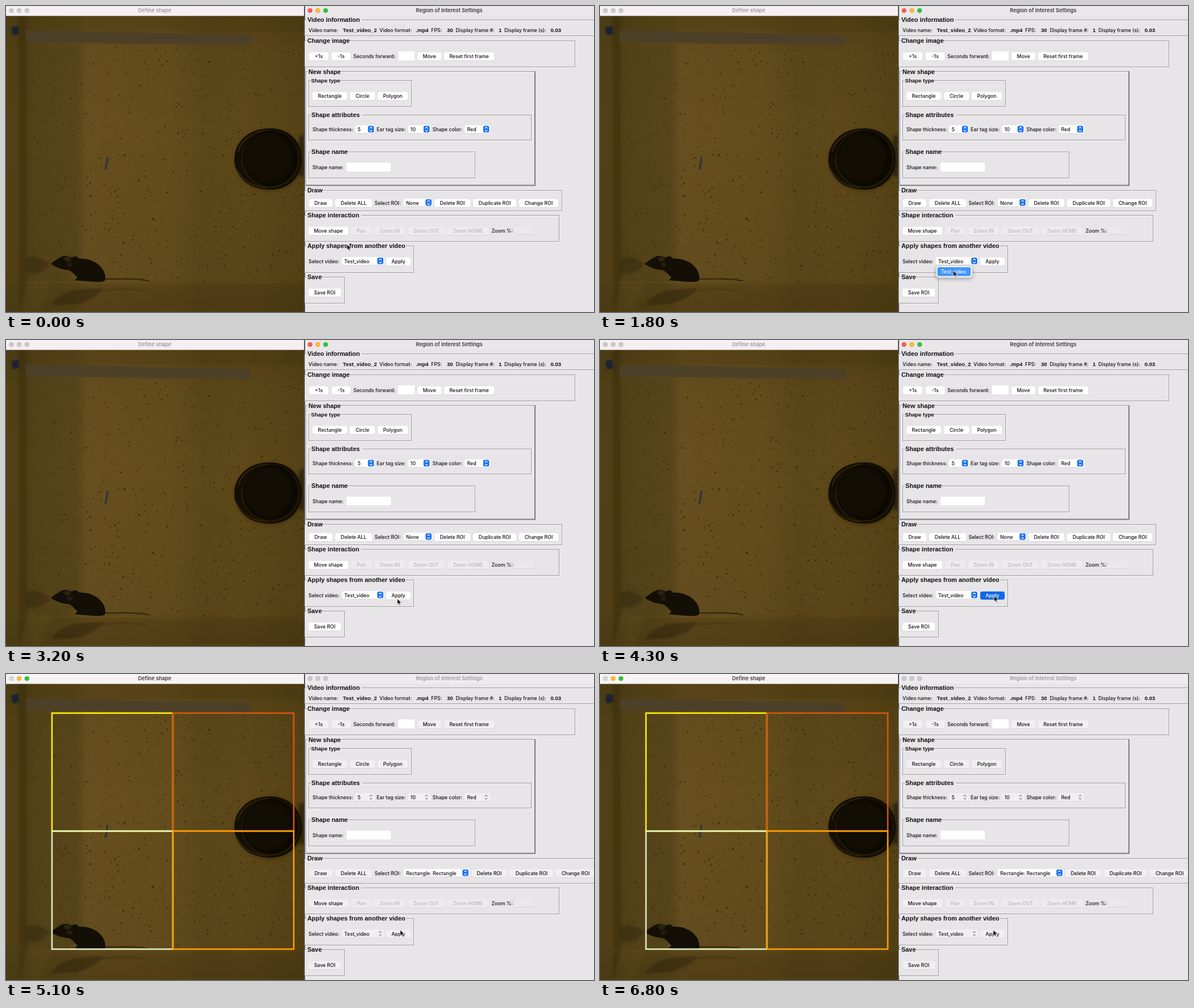
Animation, 1036 px wide and 540 px high, one loop 6900 ms. Source, as an HTML page with a canvas:

```html
<!DOCTYPE html>
<html lang="en">
<head>
<meta charset="utf-8">
<title>Region of Interest Settings</title>
<style>
html, body { margin: 0; width: 1036px; height: 540px; overflow: hidden; background: #e7e5e7; }
canvas, svg { position: absolute; left: 0; top: 0; display: block; }
text { font: 500 8.75px Inter, sans-serif; fill: #111; white-space: pre; }
.head { font: bold 10.9px "Liberation Sans", sans-serif; }
.sub { font: bold 9.6px "Liberation Sans", sans-serif; }
.title { font-size: 9.2px; font-weight: 600; fill: #3a383a; }
.mid { text-anchor: middle; }
.off, .dim { fill: #b7b5b7; }
.title.off { fill: #9d999c; }
.lit { fill: #fff; }
.line { fill: none; stroke: #9a989a; }
.pop { filter: drop-shadow(0 2px 3px rgba(0, 0, 0, .3)); }
#before, #after, #menu, #press { animation: 6900ms step-end infinite; }
#before { animation-name: before; }
#after { animation-name: after; }
#menu { animation-name: menu; }
#press { animation-name: press; }
#cursor { animation: move 6900ms infinite; }
@keyframes before { 0% { visibility: visible } 63.76%, 100% { visibility: hidden } }
@keyframes after { 0% { visibility: hidden } 63.76%, 100% { visibility: visible } }
@keyframes menu { 0% { visibility: hidden } 18.83% { visibility: visible } 33.32%, 100% { visibility: hidden } }
@keyframes press { 0% { visibility: hidden } 60.86% { visibility: visible } 63.76%, 100% { visibility: hidden } }
@keyframes move {
  0% { transform: translate(601px, 420.5px); animation-timing-function: steps(9) }
  13.04%, 20.28% { transform: translate(624px, 447px); animation-timing-function: steps(4) }
  26.08%, 33.33% { transform: translate(622.5px, 467px); animation-timing-function: steps(7) }
  43.47%, 55.06% { transform: translate(689.5px, 456.5px); animation-timing-function: steps(4) }
  60.86%, 86.95% { transform: translate(694.5px, 451.5px); animation-timing-function: steps(2) }
  89.85%, 100% { transform: translate(692.8px, 451.5px) }
}
</style>
</head>
<body>
<canvas id="video" width="526" height="540"></canvas>
<svg id="ui" width="1036" height="540" viewBox="0 0 1036 540"></svg>
<script>
const text = (x, cy, s, cls = "") => `<text x="${x}" y="${cy + 3.2}" class="${cls}">${s}</text>`;
const box = (x, y, w, h, fill, r = 0, extra = "") =>
  `<rect x="${x}" y="${y}" width="${w}" height="${h}" rx="${r}" fill="${fill}" ${extra}/>`;

function lights(x, active) {
  const colors = active || ["#cbc7ca", "#cbc7ca", "#cbc7ca"];
  return colors.map((c, i) =>
    `<circle cx="${x + i * 13.7}" cy="8" r="4.1" fill="${c}" stroke="#000" stroke-opacity=".12" stroke-width=".6"/>`).join("");
}

function button(x1, x2, cy, s, { fill = "#fff", cls = "" } = {}) {
  const w = x2 - x1;
  return box(x1, cy - 6.6, w, 14.2, "#000", 3.6, 'opacity=".13"') +
    box(x1, cy - 7.2, w, 14.2, fill, 3.6) + text((x1 + x2) / 2, cy, s, "mid " + cls);
}

function select(x1, x2, cy, s, fill, blue) {
  const cx = x2 - 7, top = cy - 6.4;
  return box(x1, cy - 6.8, x2 - x1, 13.6, "#000", 3.6, 'opacity=".11"') +
    box(x1, cy - 7.4, x2 - x1, 13.6, fill, 3.6) + text(x1 + 4.5, cy, s) +
    (blue ? box(cx - 5.3, top, 10.6, 11.4, "#1670ee", 2.8) : "") +
    `<path d="M${cx - 2.3} ${top + 4.4}l2.3-2.3 2.3 2.3m-4.6 2.8l2.3 2.3 2.3-2.3" fill="none" stroke="${blue ? "#fff" : "#8b898b"}" stroke-width="1.2"/>`;
}

function group(x1, y1, x2, y2, s, labelX, cls = "head") {
  const w = x2 - x1, h = y2 - y1, size = cls === "head" ? 5.6 : 5;
  return `<rect x="${x1 + 1.5}" y="${y1 + 1.5}" width="${w}" height="${h}" fill="none" stroke="#f8f7f8"/>` +
    `<rect x="${x1 + .5}" y="${y1 + .5}" width="${w}" height="${h}" class="line"/>` +
    box(labelX - 1, y1 - 4, s.length * size + 1, 9, "#e7e5e7") + text(labelX, y1 + .7, s, cls);
}

function panel(active) {
  const fill = active ? "#fff" : "#f1eff1";
  const extra = active ? 0 : 65, row = active ? 348 : 352, d = active ? 0 : 8;
  const dim = { fill: "#edebed", cls: "dim" };
  const btn = (x1, x2, y, s) => button(x1, x2, y, s, { fill });
  const sel = (x1, x2, y, s) => select(x1, x2, y, s, fill, active);
  const winColors = ["#fc5b54", "#f9bb2d", "#2fc440"];
  return box(0, 0, 526, 17.5, active ? "#f5eff1" : "#f7f3f4") +
    lights(9.5, active ? null : ["#d5d2d4", "#f9bb2d", "#2fc440"]) +
    text(262, 7.8, "Define shape", "mid title" + (active ? " off" : "")) +
    box(525, 0, 2, 540, "#54504c") + box(527, 0, 509, 540, "#e7e5e7") +
    box(527, 0, 509, 17, active ? "#eae7ea" : "#edebed") +
    lights(535.7, active ? winColors : null) +
    text(781, 7.8, "Region of Interest Settings", "mid title" + (active ? "" : " off")) +

    group(526, 24, 1040, 52, "Video information", 531) +
    text(533, 43, "Video name:") + text(593.5, 43, "Test_video_2", "sub") +
    text(658, 43, "Video format:") + text(722, 43, ".mp4", "sub") +
    text(749, 43, "FPS:") + text(777, 43, "30", "sub") +
    text(792.5, 43, "Display frame #:") + text(868, 43, "1", "sub") +
    text(878, 43, "Display frame (s):") + text(959.5, 43, "0.03", "sub") +

    group(526, 61, 1002, 107, "Change image", 531) +
    btn(534, 568, 89, "+1s") + btn(574, 607, 89, "-1s") +
    text(612, 89, "Seconds forward:") + box(691, 80, 29, 16, "#fff") +
    btn(725, 767, 89, "Move") + btn(772, 860, 89, "Reset first frame") +

    `<path d="M528.5 317V115.5H932" class="line"/><path d="M530 315V117H930" fill="none" stroke="#f8f7f8"/>` +
    `<path d="M528 316.5H932V115" fill="none" stroke="#7c7a7c" stroke-width="2"/>` +
    box(532, 111, 58, 9, "#e7e5e7") + text(533, 116.4, "New shape", "head") +
    group(533, 131, 714, 177, "Shape type", 537.5, "sub") +
    btn(540, 601, 159, "Rectangle") + btn(606, 650, 159, "Circle") + btn(655, 708, 159, "Polygon") +
    group(533, 192, 925, 236, "Shape attributes", 538) +
    text(540, 218, "Shape thickness:") + sel(615, 650, 218, "5") +
    text(653, 218, "Ear tag size:") + sel(708, 748, 218, "10") +
    text(751.5, 218, "Shape color:") + sel(808, 853, 218, "Red") +
    group(533, 257, 826, 303, "Shape name", 538) +
    text(540, 285, "Shape name:") + box(600, 276.5, 78, 15.5, "#fff") +

    group(526, 325, active ? 979 : 1044, active ? 361 : 369, "Draw", 531) +
    btn(534, 575, row, "Draw") + btn(580, 645, row, "Delete ALL") + text(649.5, row, "Select ROI:") +
    select(700.5, 751.5 + extra, row - .6, active ? "None" : "Rectangle: Rectangle", "#fff", true) +
    btn(755 + extra, 818 + extra, row, "Delete ROI") +
    btn(823 + extra, 899 + extra, row, "Duplicate ROI") +
    btn(904 + extra, 973 + extra, row, "Change ROI") +

    `<g transform="translate(0 ${d})">` +
    group(526, 369, 974, 415, "Shape interaction", 531) +
    btn(533, 603, 397, "Move shape") + button(608, 644, 397, "Pan", dim) +
    button(649, 703, 397, "Zoom IN", dim) + button(708, 773, 397, "Zoom OUT", dim) +
    button(778, 850, 397, "Zoom HOME", dim) + text(855.5, 397, "Zoom %:") +
    box(897, 389, 31, 15, "#eae8ea") + box(897, 403, 31, 1, "#d3d1d3") +
    group(526, 423, 718, 470, "Apply shapes from another video", 531) +
    text(533, 451, "Select video:") + sel(591.5, 666.5, 450.5, "Test_video") + btn(670, 713, 451, "Apply") +
    group(526, 478, 596, 524, "Save", 531) + btn(533, 590, 506, "Save ROI") + `</g>`;
}

const regions = [
  [81, 69, "#fdf303"], [294, 69, "#d4570e"], [81, 277, "#dcefc0"], [294, 277, "#fd9f03"]
].map(([x, y, c]) =>
  `<rect x="${x}" y="${y}" width="213" height="208.5" fill="none" stroke="${c}" stroke-width="2.6"/>`).join("");

document.getElementById("ui").innerHTML =
  `<g id="before">${panel(true)}</g><g id="after">${panel(false)}${regions}</g>` +
  `<g id="menu">` +
  box(592, 458, 64, 21.5, "#efedef", 5, 'class="pop" stroke="#c4c2c4" stroke-width=".7"') +
  box(594.5, 461, 58.5, 15.5, "#4295fb", 3) + text(601, 468.9, "Test_video", "lit") + `</g>` +
  `<g id="press">${button(670, 713, 451, "Apply", { fill: "#0f69e6", cls: "lit" })}</g>` +
  `<path id="cursor" d="M0 0V10.2L2.3 8.1 3.9 11.7 5.5 11 4 7.4H7.2Z" fill="#000" stroke="#fff" stroke-width=".8" stroke-linejoin="round"/>`;

// Still camera picture
const ctx = document.getElementById("video").getContext("2d");
let seed = 11;
const rand = () => (seed = (seed * 16807) % 2147483647) / 2147483647;

function shape(d, fill, blur = 0) {
  ctx.filter = blur ? `blur(${blur}px)` : "none";
  ctx.fillStyle = fill;
  ctx.fill(new Path2D(d));
}
function stroke(d, color, width, blur = 0) {
  ctx.filter = blur ? `blur(${blur}px)` : "none";
  ctx.strokeStyle = color;
  ctx.lineWidth = width;
  ctx.stroke(new Path2D(d));
}
function oval(x, y, rx, ry, fill, blur = 0) {
  shape(`M${x - rx} ${y}a${rx} ${ry} 0 1 0 ${2 * rx} 0a${rx} ${ry} 0 1 0 ${-2 * rx} 0`, fill, blur);
}

const floor = ctx.createLinearGradient(0, 0, 526, 0);
[[0, "#524116"], [.05, "#524115"], [.1, "#5a4719"], [.23, "#5e4a1b"], [.27, "#674f1f"],
 [.55, "#644d1c"], [.66, "#5c4719"], [.8, "#5e4819"], [1, "#554215"]].forEach(([p, c]) => floor.addColorStop(p, c));
ctx.fillStyle = floor;
ctx.fillRect(0, 0, 526, 540);
const shade = ctx.createLinearGradient(0, 0, 0, 540);
[[0, .14], [.09, .1], [.16, .03], [.4, 0], [.75, .03], [.9, .06], [.93, .1], [1, .16]]
  .forEach(([p, a]) => shade.addColorStop(p, `rgba(30,22,4,${a})`));
ctx.fillStyle = shade;
ctx.fillRect(0, 0, 526, 540);

shape("M22 17H36L38 480 24 540Z", "rgba(40,30,8,.3)", 2);
shape("M36 70H134V440L110 486H38Z", "rgba(62,50,24,.18)", 3);
shape("M36 17H526V44H36Z", "rgba(45,34,8,.1)", 1);
shape("M35 43L432 51 431 69 35 64Z", "#4c4028", .8);
stroke("M24 488L500 487", "rgba(121,92,43,.35)", 1.2, .6);
stroke("M250 487H400M440 488H515", "rgba(102,58,28,.35)", 1.3, .5);
shape("M80 490H526V540H60Z", "rgba(48,36,9,.16)", 3);
shape("M10 37L22 35 23 49 13 52 10 45Z", "#1b2233", .8);

ctx.filter = "none";
for (let i = 0; i < 2000; i++) {
  const x = 44 + rand() * 480, y = 72 + rand() * 414, r = .5 + rand() ** 3 * 1.2;
  const a = (x < 130 ? .18 : .28) + rand() * .38;
  ctx.fillStyle = `rgba(38,29,8,${a})`;
  ctx.beginPath();
  ctx.ellipse(x, y, r, r * (.7 + rand() * .6), rand() * 3, 0, 7);
  ctx.fill();
}
stroke("M179 266Q178 278 175 289", "#2f3340", 3.2, .5);

// Cup
shape("M516 230L526 226V300L516 300Z", "rgba(30,24,8,.6)", 2);
oval(464, 272, 61, 55, "rgba(25,18,3,.3)", 3);
shape("M403 262C407 237 430 215 466 216C500 216 521 240 521 270C521 300 500 324 467 324C438 324 420 313 411 298C403 286 401 275 403 262Z", "#130e04", .7);
stroke("M409 258C412 240 432 221 462 219M407 288C414 304 430 318 458 321", "#3a2b0d", 1.6, .6);
stroke("M418 260C411 285 426 307 452 314", "#4a3812", 2, .8);
oval(466, 270, 51, 51, "#231a08", .6);
oval(466, 269, 49, 49, "#0c0902", .5);
oval(461, 268, 43, 44, "#120e05", 2);

// Mouse, wall shadow and reflection
shape("M36 446Q55 438 72 452L78 456 66 467Q48 476 36 470Z", "rgba(46,37,16,.45)", 2);
shape("M80 528C92 507 118 500 148 499L172 498C162 510 150 520 122 526Z", "rgba(38,30,10,.42)", 1.8);
stroke("M170 502Q205 497 245 502", "rgba(40,30,10,.35)", 2.2, .8);
stroke("M170 481C188 484 215 478 252 485", "#33220f", 2, .5);
shape("M79 455C85 450 90 447 95 444C101 439 109 441 116 444C121 440 126 442 129 446C146 444 163 453 170 464C175 471 176 480 174 485C166 489 146 486 133 485L121 484 126 479C120 474 117 468 110 466C98 465 86 461 79 455Z", "#130f06", .6);
shape("M101 445Q108 439 115 446Q113 452 106 451Z", "#2a2312", .6);
oval(112, 456, 5, 4, "#251e0f", 1.2);
</script>
</body>
</html>
```
